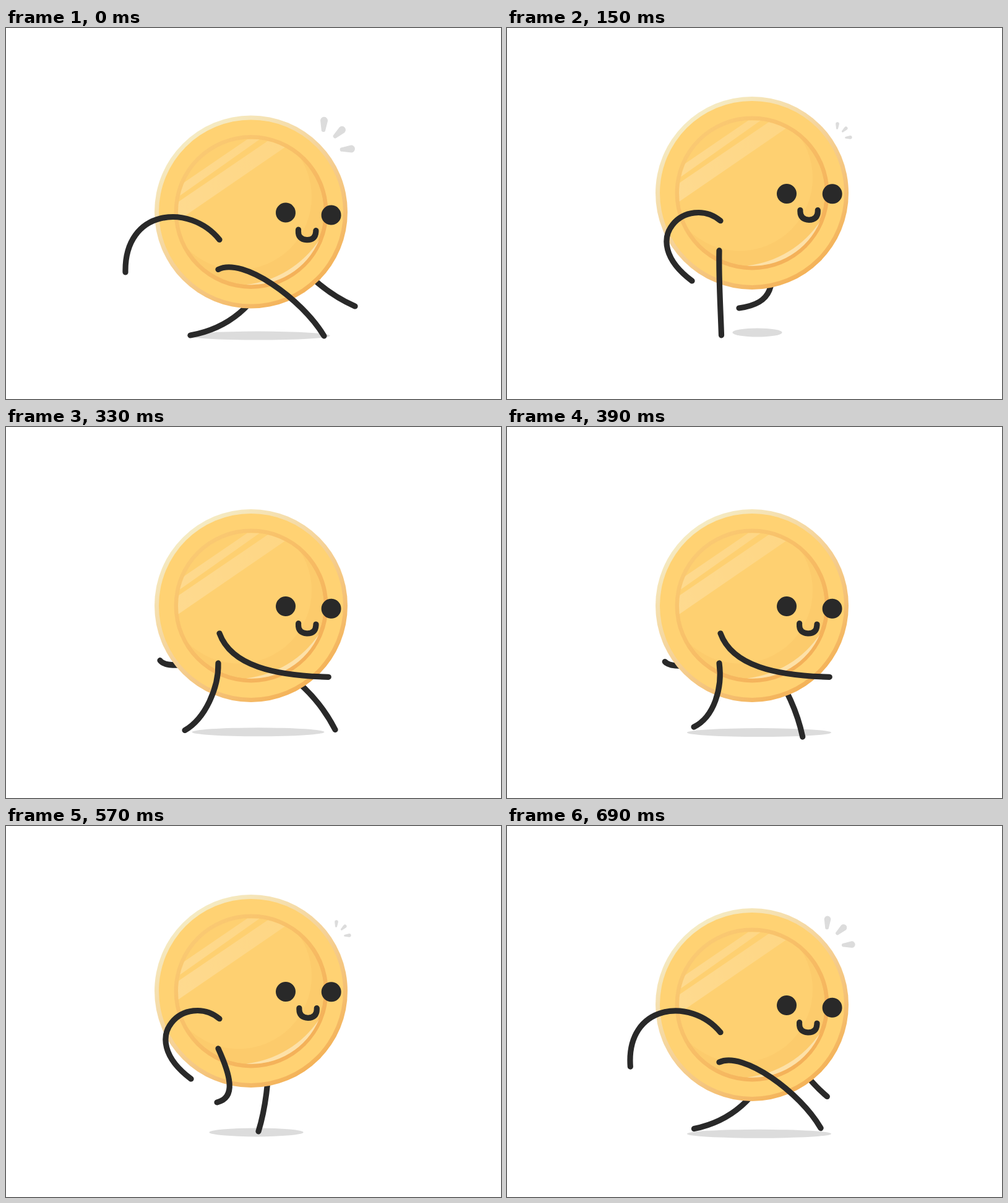
Animation, 800 px wide and 600 px high, one loop 720 ms. Source, as an HTML page:

```html
<!DOCTYPE html>
<html lang="en">
<head>
<meta charset="utf-8">
<title>Running coin</title>
<style>
  html, body { margin: 0; width: 100%; height: 100%; overflow: hidden; background: #fff; }
  svg { display: block; width: 100%; height: 100%; }
  .limb { fill: none; stroke: #292929; stroke-width: 9.2; stroke-linecap: round; stroke-linejoin: round; }
  .ink { fill: #292929; }
  .grey { fill: #dcdcdc; }
</style>
</head>
<body>
<svg viewBox="0 0 800 600">
  <defs>
    <linearGradient id="rim" gradientUnits="userSpaceOnUse" x1="296" y1="177" x2="484" y2="430">
      <stop offset="0" stop-color="#f5ebc3"/>
      <stop offset=".5" stop-color="#f5d094"/>
      <stop offset="1" stop-color="#f4b257"/>
    </linearGradient>
    <linearGradient id="groove" gradientUnits="userSpaceOnUse" x1="310" y1="210" x2="480" y2="385">
      <stop offset="0" stop-color="#fac972"/>
      <stop offset="1" stop-color="#f4b159"/>
    </linearGradient>
    <linearGradient id="shine" gradientUnits="userSpaceOnUse" x1="280" y1="290" x2="440" y2="185">
      <stop offset="0" stop-color="#fff" stop-opacity=".21"/>
      <stop offset="1" stop-color="#fff" stop-opacity=".14"/>
    </linearGradient>
    <clipPath id="disc"><circle cx="396" cy="297.5" r="118"/></clipPath>
    <path id="drop" d="M-3.3 0L-6-15A6 6 0 0 1 6-15L3.3 0A3.3 3.3 0 0 1-3.3 0Z"/>
  </defs>

  <ellipse id="shadow" class="grey" ry="7"/>
  <g id="sparks" class="grey">
    <use href="#drop" transform="translate(-39 4.8) rotate(4)"/>
    <use href="#drop" transform="translate(-20 15) rotate(47)"/>
    <use href="#drop" transform="translate(-9 36.5) rotate(86)"/>
  </g>

  <g id="body">
    <path id="backArm" class="limb"/>
    <path id="backLeg" class="limb"/>
    <circle cx="396" cy="297.5" r="156" fill="url(#rim)"/>
    <circle cx="396" cy="297.5" r="149" fill="#ffd273"/>
    <circle cx="396" cy="297.5" r="124.5" fill="url(#groove)"/>
    <g clip-path="url(#disc)">
      <circle cx="396" cy="297.5" r="118" fill="#fccb6c"/>
      <circle cx="376" cy="273" r="118" fill="#fed071"/>
      <path d="M270 262L390 180H410L270 279Z" fill="url(#shine)"/>
      <path d="M270 287L427 180L455 190L270 317Z" fill="url(#shine)"/>
    </g>
    <path d="M388 415A118 118 0 0 0 506 343A163 163 0 0 1 388 415Z" fill="#fde1a8"/>
    <g id="face">
      <circle class="ink" cx="452" cy="298.600" r="16"/>
      <circle class="ink" cx="525.700" cy="298.600" r="16"/>
      <path class="limb" stroke-width="8.6" d="M474 325v2c0 9 5 13.700 14.200 13.700s14.200-4.700 14.200-13.700v-2"/>
    </g>
    <path id="frontLeg" class="limb"/>
    <path id="frontArm" class="limb"/>
  </g>
</svg>

<script>
const LOOP = 720, STEP = 30;

const linear = u => u;
const easeIn = p => u => u ** p;
const easeOut = p => u => 1 - (1 - u) ** p;

// A pose is the last three points of a cubic; each key eases into the next one.
const key = (time, ease, ...pose) => ({ time, ease, pose });
const tucked = [430, 390, 450, 430, 400, 436];

const limbs = {
  frontArm: { joint: [345, 342.3], mirrored: true, keys: [
    key(0, easeIn(1.75), 297, 283, 191, 292, 193, 395),
    key(150, linear, 293, 299, 206, 370, 299, 439.5),
    key(270, easeOut(2), 317, 370, 350, 418, 419, 427.5),
    key(360, linear, 370, 398, 445, 410, 534, 411)
  ] },
  backArm: { joint: [450, 345], keys: [
    key(0, easeOut(2), 470, 388, 515, 428, 564, 450),
    key(150, easeOut(2.6), ...tucked),
    key(330, easeIn(2.3), 330, 397, 259, 401, 249, 386),
    key(570, easeIn(1.5), ...tucked)
  ] },
  frontLeg: { joint: [343, 390.5], keys: [
    key(0, easeOut(2), 383, 370, 478, 438, 514, 498),
    key(150, easeIn(1.5), 342, 436, 345, 480, 346.5, 527.5),
    key(330, linear, 344, 430, 322, 480, 289, 499),
    key(570, easeOut(2), 362, 432, 373, 470, 341, 477.5)
  ] },
  backLeg: { joint: [425, 392], keys: [
    key(0, easeOut(2), 405, 447, 360, 486, 298, 497),
    key(150, easeOut(1.7), 432, 445, 432, 476, 375, 483.5),
    key(330, easeOut(2), 460, 405, 505, 445, 532, 498),
    key(570, easeOut(2), 425, 440, 420, 485, 408, 524.5)
  ] }
};

const el = id => document.getElementById(id);
const mirror = (t, period) => Math.min(t % period, period - t % period);
const set = (id, attrs) => {
  for (const k in attrs) el(id).setAttribute(k, attrs[k]);
};

function poseAt(keys, t) {
  const i = keys.findLastIndex(k => k.time <= t);
  const a = keys[i], b = keys[i + 1] || { ...keys[0], time: LOOP };
  const u = a.ease((t - a.time) / (b.time - a.time));
  return a.pose.map((v, n) => v + (b.pose[n] - v) * u);
}

function draw(t) {
  const turn = t / LOOP * 2 * Math.PI;
  const { cos, sin } = Math;
  const swing = mirror(t, LOOP);
  const hop = mirror(t, LOOP / 2) / (LOOP / 4);

  const lift = -31 * (1 - (1 - hop ** 1.2) ** 2.6);
  const tilt = 1.55 * (1 + cos(2 * turn));
  set("body", { transform: `translate(0 ${lift})` });
  set("face", { transform: `rotate(${tilt} 452 298.6)` });
  set("sparks", { transform: `translate(552 160) scale(${Math.max(0, 1 - swing / 285)})` });
  set("shadow", {
    cx: 406 + 1.7 * cos(2 * turn),
    cy: 494.5 + 1.2 * cos(2 * turn) + 1.9 * cos(turn) - 1.5 * sin(turn),
    rx: 85 + 31 * cos(2 * turn) - 18.6 * sin(turn)
  });

  for (const id in limbs) {
    const { joint, keys, mirrored } = limbs[id];
    set(id, { d: `M${joint}C${poseAt(keys, mirrored ? swing : t)}` });
  }
}

const start = performance.now();
function tick() {
  const t = (performance.now() - start) % LOOP;
  draw(Math.floor(t / STEP) * STEP);
  requestAnimationFrame(tick);
}
tick();
</script>
</body>
</html>
```
